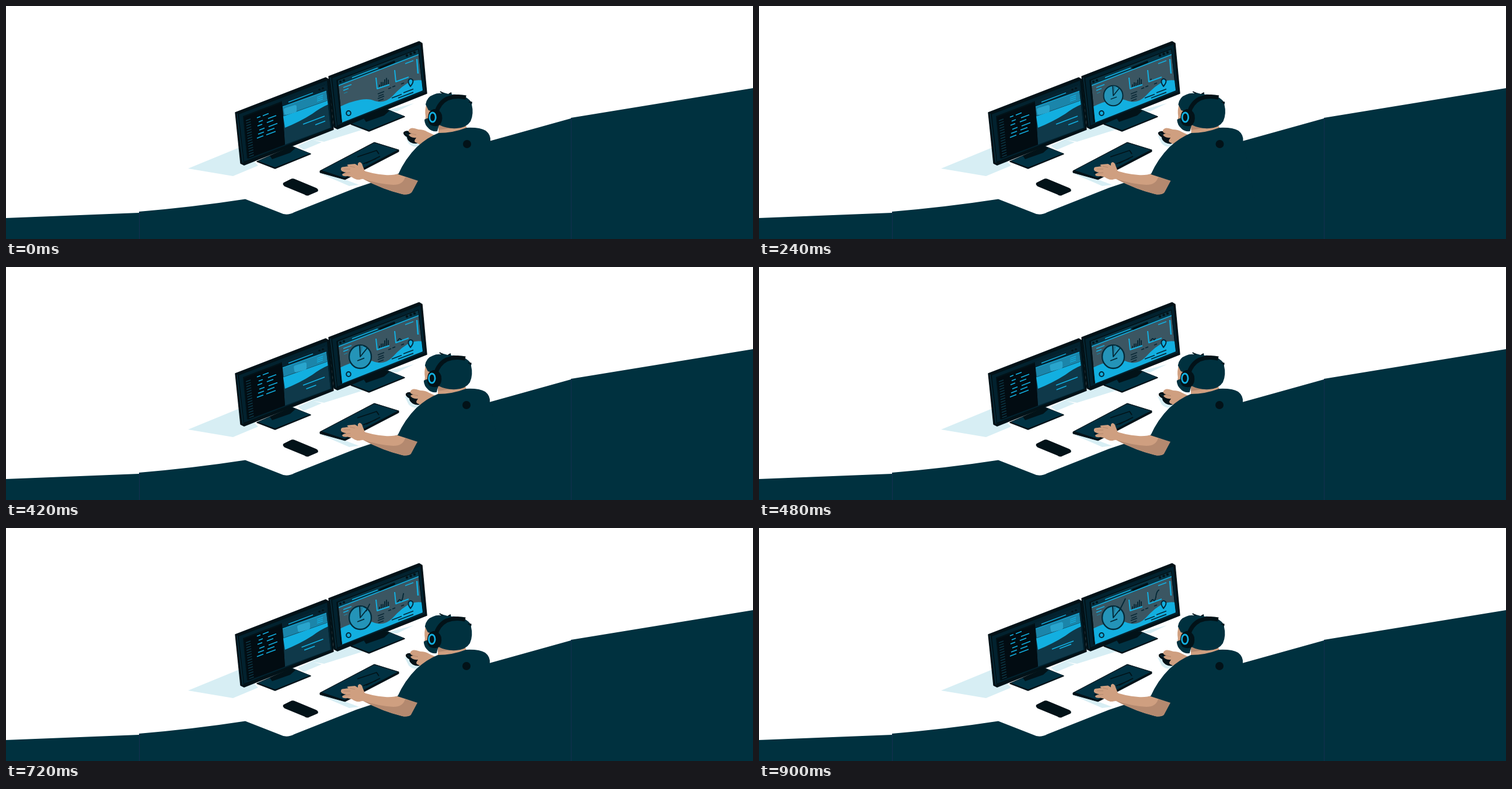
Recreate the animation shown at these times as an HTML page with a canvas. Size 1280 px wide and 400 px high, loop 960 ms.

```html
<!DOCTYPE html>
<html lang="en">
<head>
<meta charset="utf-8">
<title>At the desk</title>
<style>
html, body { margin: 0; width: 100%; height: 100%; overflow: hidden; background: #fff; }
canvas { display: block; }
</style>
</head>
<body>
<canvas id="stage" width="1280" height="400"></canvas>
<script>
const ctx = document.getElementById('stage').getContext('2d');
const LOOP = 960, STEP = 60;
const NAVY = '#00313f', INK = '#021218', FRAME = '#02222f', CYAN = '#12afe0',
      GREY = '#3b5662', PALE = '#d7eef4', SKIN = '#cf9f80', SHADE = '#b4896f';
const SLOPE = -0.38;

const clamp = v => Math.max(0, Math.min(1, v));
const ease = v => v * v * (3 - 2 * v);
const ramp = (f, a, b) => ease(clamp((f - a) / (b - a)));
const mix = (a, b, k) => a + (b - a) * k;

function fill(d, color) {
  ctx.fillStyle = color;
  ctx.fill(new Path2D(d));
}
function line(d, color, width = 1.5, cap = 'butt') {
  ctx.strokeStyle = color;
  ctx.lineWidth = width;
  ctx.lineCap = cap;
  ctx.lineJoin = 'round';
  ctx.stroke(new Path2D(d));
}
// Shape with a thin rim of the same colour
function block(d, color, rim = 1.4) {
  fill(d, color);
  line(d, color, rim);
}
// Stroke that follows the tilt of the screens
function dash(x, y, len, color, width = 1.7) {
  line(`M${x} ${y}l${len} ${len * SLOPE}`, color, width);
}
function oval(x, y, rx, ry, color, width) {
  ctx.beginPath();
  ctx.ellipse(x, y, rx, ry, 0, 0, Math.PI * 2);
  if (width) {
    ctx.strokeStyle = color;
    ctx.lineWidth = width;
    ctx.stroke();
  } else {
    ctx.fillStyle = color;
    ctx.fill();
  }
}
function moved(x, y, draw) {
  ctx.save();
  ctx.translate(x, y);
  draw();
  ctx.restore();
}
function clipped(d, draw) {
  ctx.save();
  ctx.clip(new Path2D(d));
  draw();
  ctx.restore();
}

function ground() {
  fill('M0 364L228 355V353Q322 345 410 331.5L470 355Q481 361 494 354L600 312L672 288L830 231.5L968 193V192L1280 141V400H0Z', NAVY);
  line('M228.5 354V400M968.5 192V400', '#152f50', 1);
}

function shadows() {
  fill('M312 279L402 242L432 274L389 292Z', PALE);
  fill('M500 240L560 212L592 204L612 212L545 233L526 230L541 234L510 247Z', PALE);
  fill('M650 180L699 167L670 181Z', PALE);
  fill('M535 286L581 298L605 307L588 309Z', PALE);
  fill('M683 222L690 236Q700 246 712 238L706 228Z', PALE);
}

function stand(x, y) {
  moved(x, y, () => {
    block('M0 0L60 -26L92 -13L31 12Z', INK);
    fill('M2 -1L60 -26L91 -14L31 10Z', '#013243');
    fill('M22 -10L59 -26L66 -23L57 -15L26 -4Z', INK);
  });
}

function shell(x, y) {
  moved(x, y, () => {
    block('M0 0L155 -60L160 -57L168 29L15 90L9 87Z', INK);
    fill('M6 3L157 -55L165 26L15 84Z', FRAME);
    fill('M13 6L154 -48L162 24L20 79Z', INK);
    line('M3 2L13 86', '#0a3b4e', 1);
  });
}

function code(f) {
  clipped('M426 182L470 165L475 214L430 231Z', () => {
    const drift = ramp(f, 0, 15) * 7;
    for (let r = 0; r < 6; r++) {
      const y = 192 + r * 7 - drift;
      const gap = 4 + (r * 5) % 6;
      const x = 430 + (r * 3) % 5;
      const first = 6 + (r * 7) % 6;
      dash(x, y, first, CYAN, 1.6);
      dash(x + first + gap, y - (first + gap) * 0.36, 10 + (r * 4) % 7, CYAN, 1.6);
    }
  });
}

function leftScreen(f) {
  shell(393, 183);
  fill('M408 191L473 166L478 238L415 262Z', '#020c12');
  for (let i = 0; i < 15; i++) dash(411 + i * 0.4, 197 + i * 4.4, 8, '#0c3847', 1.5);
  code(f);

  clipped('M473 163L548 135L556 209L478 238Z', () => {
    fill('M473 163L548 135L556 209L478 238Z', '#0f394a');
    fill('M473 163L548 135L549 146L474 173Z', '#052432');
    dash(484, 165, 42, CYAN, 1.4);
    for (let i = 0; i < 2; i++) oval(537 + i * 6, 143.5 - i * 2.2, 1.8, 1.8, INK);
    fill('M474 173L549 146L551 163L476 190Z', '#1b85aa');
    fill('M475 189L551 161L552 169Q538 175 525 185Q503 199 478 209Z', CYAN);
    line('M474 173L549 146', CYAN, 1.2);
    line('M475 189L551 162', '#174e63', 1);
    for (let i = 0; i < 3; i++) dash(533, 157 + i * 3.2, 10, CYAN, 1.3);

    const k = ramp(f, 4, 8.5);
    moved(mix(487, 510, k), mix(178, 169.5, k), () =>
      fill('M-11 0Q-11 -2 -8 -3L8 -8Q11 -8 11 -5L11 2Q11 4 8 5L-7 9Q-10 9 -10 6Z', '#29a5cd'));

    const late = ramp(f, 10, 15);
    dash(mix(509, 502, late), mix(203, 208, late), 37, CYAN);
    const x = mix(mix(530, 509, k), 515, late);
    dash(x, mix(mix(204, 211, k), 207, late), mix(17, 20, late), CYAN);
  });
  stand(430, 267);
}

function pie(f) {
  const r = 20 * Math.sin(Math.PI / 2 * clamp(f / 6));
  if (r <= 0) return;
  ctx.save();
  ctx.translate(607, 154);
  ctx.scale(r / 20, r / 20);
  oval(0, 0, 19, 20, '#2494b8');
  oval(0, 0, 19, 20, '#032c3b', 2.3);
  fill('M-1 -19L0 -1L5 -19Z', '#247a96');
  line('M-1 -19L0 0L12 -15', '#032c3b', 2);
  dash(-5, 7, 12, '#032c3b', 1.8);
  ctx.restore();
}

// Partial stroke of a path with known length
function grow(d, length, k) {
  if (k <= 0) return;
  ctx.setLineDash([length * k, length * 2]);
  line(d, '#032735', 1.8);
  ctx.setLineDash([]);
}

function charts(f) {
  line('M634 123L636 142L657 135', CYAN, 2);
  for (let i = 0; i < 6; i++) {
    const x = 640 + i * 3;
    const h = [4, 7, 6, 10, 12, 8][i] + Math.sin(f * 0.5 + i) * 0.5;
    line(`M${x} ${139 - i}V${139 - i - h}`, '#0a2936', 2);
  }
  line('M666 110L668 130L690 122', CYAN, 2);
  grow('M671 127Q674 121 676 124T680 119Q681 108 686 106', 30, clamp((f - 3) / 12));
  for (let i = 0; i < 4; i++) dash(637 + (i % 2), 151 + i * 4, 11 - (i % 2) * 2, '#0a2936', 1.7);
  for (const [x, y] of [[655, 142], [662, 139], [677, 134]]) dash(x, y, 5, '#0a2936', 1.7);
}

function rightScreen(f) {
  shell(553, 121);
  const screen = 'M569 128L706 75L714 145L576 200Z';
  clipped(screen, () => {
    fill(screen, GREY);
    fill('M568 128L706 75L707 83L570 136Z', '#073546');
    line('M570 136.5L708 83', CYAN, 1.4);
    oval(573, 130, 2, 2, INK);
    oval(579, 127.5, 2, 2, INK);
    for (let i = 0; i < 3; i++) oval(687 + i * 6.5, 85 - i * 2.6, 2.2, 2.2, INK);
    dash(593, 123, 44, CYAN, 1.5);
    line('M641 106L665 96', INK, 4, 'round');

    fill('M572 173Q590 164 607 161Q622 158 632 163Q649 168 662 155Q680 135 695 129Q706 126 714 128V147L576 200Z', CYAN);
    dash(578, 140, 14, CYAN);
    dash(578, 145, 9, CYAN);
    dash(579, 150, 6, '#1c829f', 1.3);
    dash(684, 99, 14, CYAN);
    line('M704 91L706 116', CYAN, 2.5);
    charts(f);

    oval(587, 184, 3.8, 4, '#03283a', 2);
    const pin = 'M693 138Q688 131 690 127Q693 123 697 127Q699 131 693 138Z';
    fill(pin, CYAN);
    line(pin, '#03283a', 2);
    dash(661, 158, 17, '#03283a');
    dash(681, 149, 17, '#03283a');
    dash(672, 158, 26, '#03283a');
    pie(f);
    grow('M617 143L628 121', 25, clamp((f - 8) / 7));
  });
  stand(591, 203);
}

function desk() {
  block('M538 283L631 234L673 247L673 250L581 298L538 286Z', INK, 1);
  fill('M541 282L631 235L671 247L580 295Z', '#013142');
  line('M602 259L635 248L639 254M612 271L634 262M617 270L641 258M574 287L590 279', INK, 1.8);
  block('M476 304L488 298Q491 296 495 298L531 313Q536 316 533 318L519 324Q516 326 512 323L478 309Q474 306 476 304Z', INK, 1.6);
}

function mouseHand(f) {
  const k = ramp(f, 0, 6);
  moved(4 * k, 0.5 * k, () => {
    fill('M681 217Q684 213 691 215L703 224L707 235Q701 238 693 234Q687 230 687 225Q680 221 681 217Z', INK);
    line('M684 218Q692 224 701 225', '#0b3a4b', 1);
  });
  moved(3 * k, 0, () => {
    fill('M690 213Q693 208 700 210L707 212Q716 212 722 216L737 223L712 240L704 235Q698 233 701 229L703 226Q693 227 690 221Q692 219 695 219Q688 217 690 213Z', SKIN);
    line('M694 219L703 221', SHADE, 1);
  });
}

function arm(f) {
  fill('M585 287L608 281Q626 288 650 290Q664 291 675 287L707 299Q702 313 696 319Q690 325 679 323Q646 315 612 297L602 298Z', SKIN);
  fill('M612 297Q640 306 664 307Q680 307 684 294L707 299Q701 314 695 320Q689 325 679 323Q646 315 612 297Z', SHADE);
  moved(0, Math.sin(f * Math.PI / 2) * 0.4, () => {
    fill('M574 279Q574 276 580 276L587 275Q582 273 587 272L598 271L603 274Q602 269 606 268Q610 269 611 274L615 284L607 298Q599 299 593 294L585 292Q576 293 576 289Q578 287 583 286Q572 284 574 279Z', SKIN);
    line('M579 280L590 280M580 287L590 286M589 275L598 277', SHADE, 1);
  });
}

function shirt() {
  fill('M672 289Q684 262 704 242Q723 225 741 218Q766 218 789 209Q812 208 822 214Q831 221 830 232L850 330H690L706 300Z', NAVY);
  oval(790, 237, 7, 7, INK);
}

function head() {
  fill('M721 166Q717 179 719 190L718 196L732 203L740 176Z', SKIN);
  // hair and beard
  fill('M719 169Q721 156 733 152Q739 149 747 150L743 147Q751 149 758 151L763 148L764 152Q775 151 787 156Q795 161 797 165L799 166L798 169Q802 185 796 198Q789 209 772 210Q756 211 742 204L736 183L724 179Z', NAVY);
  fill('M717 195Q724 190 736 194L742 204L739 215Q730 216 725 211Q717 204 717 195Z', NAVY);
  line('M744 147L750 150M759 151L763 149M793 165L798 165L796 168', INK, 1.5);
  // headset
  line('M737 184Q742 166 756 159Q771 153 788 157', INK, 7);
  fill('M723 191Q724 179 733 177Q743 176 747 187Q749 199 742 205Q735 208 727 204Q722 198 723 191Z', INK);
  oval(731, 191, 5.3, 8, CYAN, 2.8);
}

function person(f) {
  const lean = ramp(f, 0, 8);
  mouseHand(f);
  arm(f);
  moved(-lean, 0, () => {
    fill('M741 203L787 201L790 211Q765 220 741 219Z', SKIN);
    fill('M741 203L782 207L741 213Z', SHADE);
    shirt();
  });
  moved(-1.2 * lean, 0, head);
}

function draw(now) {
  const f = Math.floor((now % LOOP) / STEP);
  ctx.fillStyle = '#fff';
  ctx.fillRect(0, 0, 1280, 400);
  shadows();
  ground();
  leftScreen(f);
  rightScreen(f);
  desk();
  person(f);
}

const start = performance.now();
function tick() {
  draw(performance.now() - start);
  requestAnimationFrame(tick);
}
tick();
</script>
</body>
</html>
```
